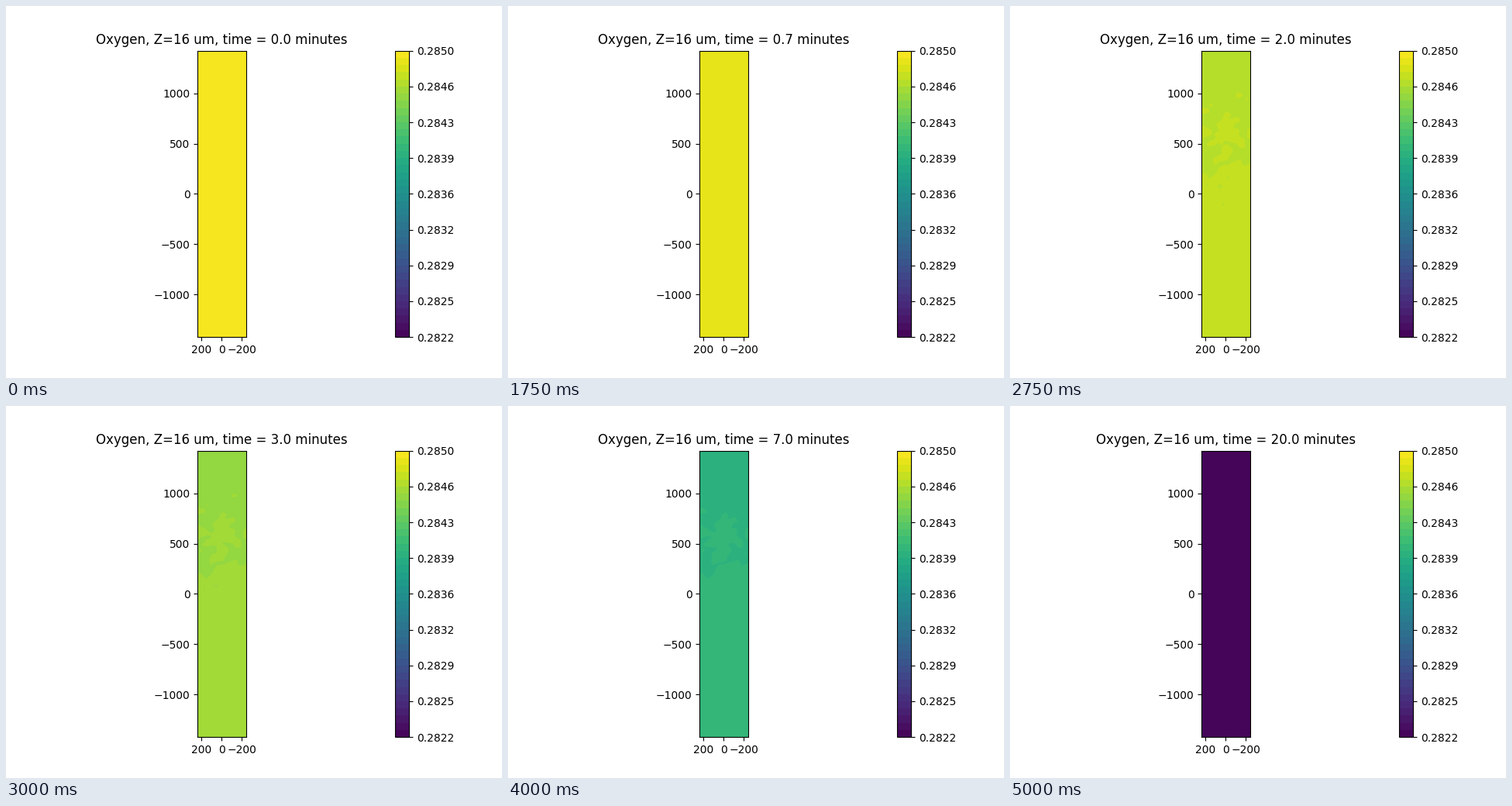
Recreate the animation shown at these times as a matplotlib script. Size 640x480 px, loop 5250 ms.

```python
import numpy as np
import matplotlib.pyplot as plt
from matplotlib.animation import FuncAnimation

plt.rcParams["text.kerning_factor"] = 6

TOP, BOTTOM, BANDS = 0.285, 0.28219, 40
LEVELS = np.linspace(BOTTOM, TOP, BANDS + 1)
TIMES = [k / 10 for k in range(10)] + [float(k) for k in range(1, 11)] + [20.0]

X, Y = np.meshgrid(np.linspace(-240, 240, 16), np.linspace(-1424, 1424, 90))


def smooth(a, axis):
    return (np.roll(a, 1, axis) + 2 * a + np.roll(a, -1, axis)) / 4


def blob(x, y, rx, ry):
    return np.exp(-((X - x) / rx) ** 2 - ((Y - y) / ry) ** 2)


noise = smooth(smooth(np.random.default_rng(7).normal(size=X.shape), 0), 1)
noise /= noise.std()

# Local consumption: high at the upper end, low below the middle
uptake = np.interp(Y, [-1424, -600, 0, 300, 700, 1424],
                   [-1.0, -1.7, -1.7, 0.0, 0.6, 3.2])
uptake += 1.7 * blob(160, 210, 110, 190) + 0.6 * blob(-140, 400, 110, 200)
uptake -= 1.3 * blob(60, 480, 110, 220)


def field(t):
    """Concentration falls two bands a minute, a little unevenly in space."""
    fade = 1 / max(t, 0.5)
    uneven = uptake + (0.5 + 0.5 * fade) * noise - 0.3 * (1 - fade)
    band = np.clip(BANDS - 2 * t - 0.02 * uneven, 0.05, BANDS - 0.05)
    return BOTTOM + (TOP - BOTTOM) * band / BANDS


def fill(t):
    return ax.contourf(X, Y, field(t), levels=LEVELS, cmap="viridis",
                       vmin=BOTTOM, vmax=TOP)


fig, ax = plt.subplots(figsize=(6.4, 4.8), dpi=100)
shown = fill(0)
bar = fig.colorbar(shown, ax=ax, ticks=LEVELS[::5], format="%.4f")
bar.minorticks_off()
ax.set_aspect("equal", adjustable="box", anchor="C")
ax.set_xlim(240, -240)
ax.set_ylim(-1424, 1424)
ax.set_xticks([200, 0, -200])
ax.set_yticks(range(-1000, 1001, 500))
title = ax.set_title("")


def update(i):
    global shown
    t = TIMES[i]
    shown.remove()
    shown = fill(t)
    title.set_text(f"Oxygen, Z=16 um, time = {t:.1f} minutes")
    return shown, title


anim = FuncAnimation(fig, update, frames=len(TIMES), interval=250,
                     repeat=True, repeat_delay=0, blit=False)
plt.show()
```
